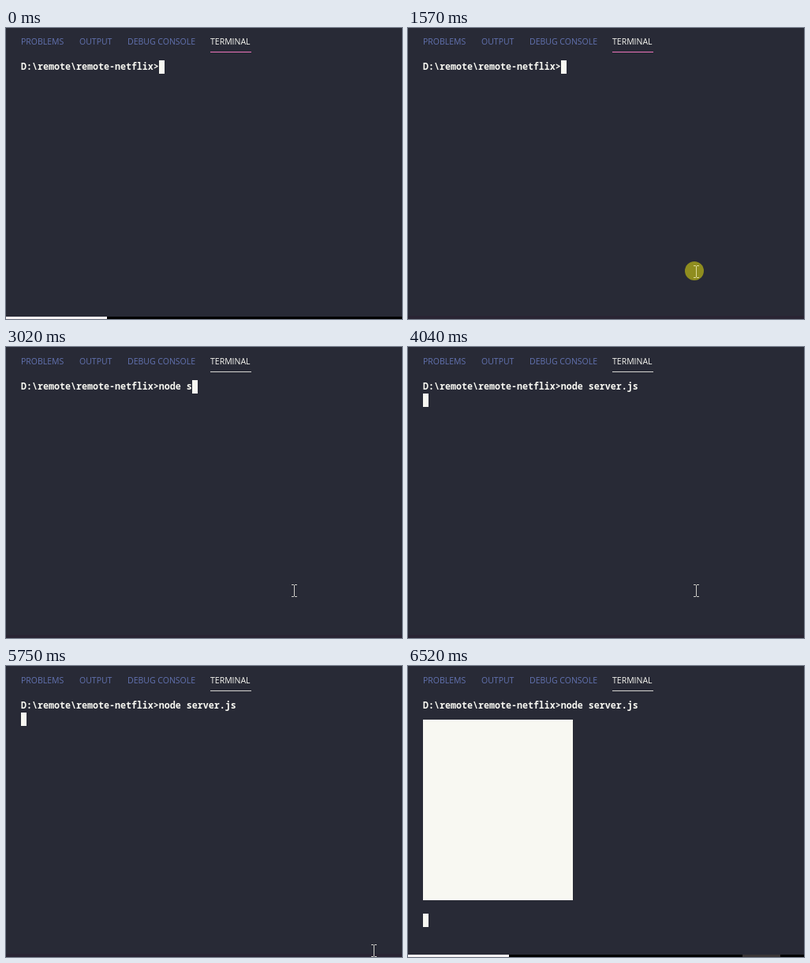
Recreate the animation shown at these times as an HTML page with a canvas. Size 502 by 369 pixels, loop 6580 ms.

```html
<!DOCTYPE html>
<html lang="en">
<head>
<meta charset="utf-8">
<title>Terminal session</title>
<style>
  html, body { margin: 0; width: 100%; height: 100%; overflow: hidden; background: #282a36; }
  canvas { display: block; }
</style>
</head>
<body>
<canvas id="stage" width="502" height="369"></canvas>
<script>
const ctx = document.getElementById('stage').getContext('2d');
const LOOP = 6580;
const LEFT = 19, CELL = 7, LINE = 17;
const WHITE = '#f8f8f2';
const PROMPT = 'D:\\remote\\remote-netflix>';
const COMMAND = 'node server.js';
const TABS = [['PROBLEMS', 19], ['OUTPUT', 93], ['DEBUG CONSOLE', 154], ['TERMINAL', 259]];

const FOCUS = 1640, ENTER = 4040, PRINT = 5780, TASKBAR = 6520;

// [time, characters typed]
const TYPING = [[0, 0], [2430, 1], [2520, 2], [2610, 3], [2700, 4], [2790, 5],
  [3020, 6], [3140, 7], [3250, 8], [3610, COMMAND.length]];

// [time, x, y] of the mouse pointer; it jumps between samples
const POINTER = [[0, 0, 400], [1370, 402, 352], [1430, 374, 318], [1470, 365, 309],
  [5690, 398, 326], [5720, 444, 350], [5750, 466, 361], [5780, 469, 363],
  [5850, 471, 366], [5900, 473, 370], [5950, 474, 374], [6010, 474, 400]];

const latest = (steps, t) => steps.filter(step => step[0] <= t).pop();

function box(color, x, y, w, h) {
  ctx.fillStyle = color;
  ctx.fillRect(x, y, w, h);
}

function text(str, x, y, color, font) {
  ctx.fillStyle = color;
  ctx.font = font;
  ctx.fillText(str, x, y);
}

function drawTabs(shift, focused) {
  for (const [label, x] of TABS) {
    const active = label === 'TERMINAL';
    text(label, x, 21 + shift, active ? WHITE : '#6272b0',
      '10.5px "Open Sans", "Noto Sans", sans-serif');
  }
  box(focused ? '#d6d6d2' : '#ee74bb', 259, 30 + shift, 52, 1);
}

function drawTerminal(t, shift) {
  const typed = latest(TYPING, t)[1];
  const top = 41 + shift;
  text(PROMPT + COMMAND.slice(0, typed), LEFT, top + 12, WHITE,
    '600 11.667px "Noto Sans Mono", "DejaVu Sans Mono", monospace');

  let column = PROMPT.length + typed, row = 0;
  if (t >= ENTER) { column = 0; row = 1; }
  if (t >= PRINT) {
    row = 16;
    box(WHITE, LEFT, 68, 190, 229);
  }
  box(WHITE, LEFT + column * CELL, top + row * LINE, CELL, LINE);
}

function drawBottom(t) {
  box('#292433', 0, 365, 502, 4);
  if (t >= 1370 && t < TASKBAR) return;
  box('#282a36', 0, 365, 502, 1);
  box('#000', 128, 366, 374, 3);
  box('#fbf5f7', 0, 366, 128, 3);
  if (t >= TASKBAR) box('#3a3536', 424, 366, 48, 3);
}

function drawPointer(t) {
  const [, x, y] = latest(POINTER, t);
  const clicking = t >= 1500 && t < FOCUS;
  if (clicking) {
    ctx.fillStyle = '#8f8d1f';
    ctx.beginPath();
    ctx.arc(x - 2, y - 1, 12, 0, Math.PI * 2);
    ctx.fill();
  }
  const color = clicking ? '#dedc9a' : '#cfcfca';
  box(color, x, y - 7, 1, 14);
  for (const edge of [y - 8, y + 7]) {
    box(color, x - 3, edge, 3, 1);
    box(color, x + 1, edge, 3, 1);
  }
}

function draw(t) {
  const focused = t >= FOCUS;
  const shift = focused ? 1 : 0;
  box('#282a36', 0, 0, 502, 369);
  drawTabs(shift, focused);
  drawTerminal(t, shift);
  drawBottom(t);
  drawPointer(t);
}

function tick() {
  draw(performance.now() % LOOP);
  requestAnimationFrame(tick);
}
tick();
</script>
</body>
</html>
```
